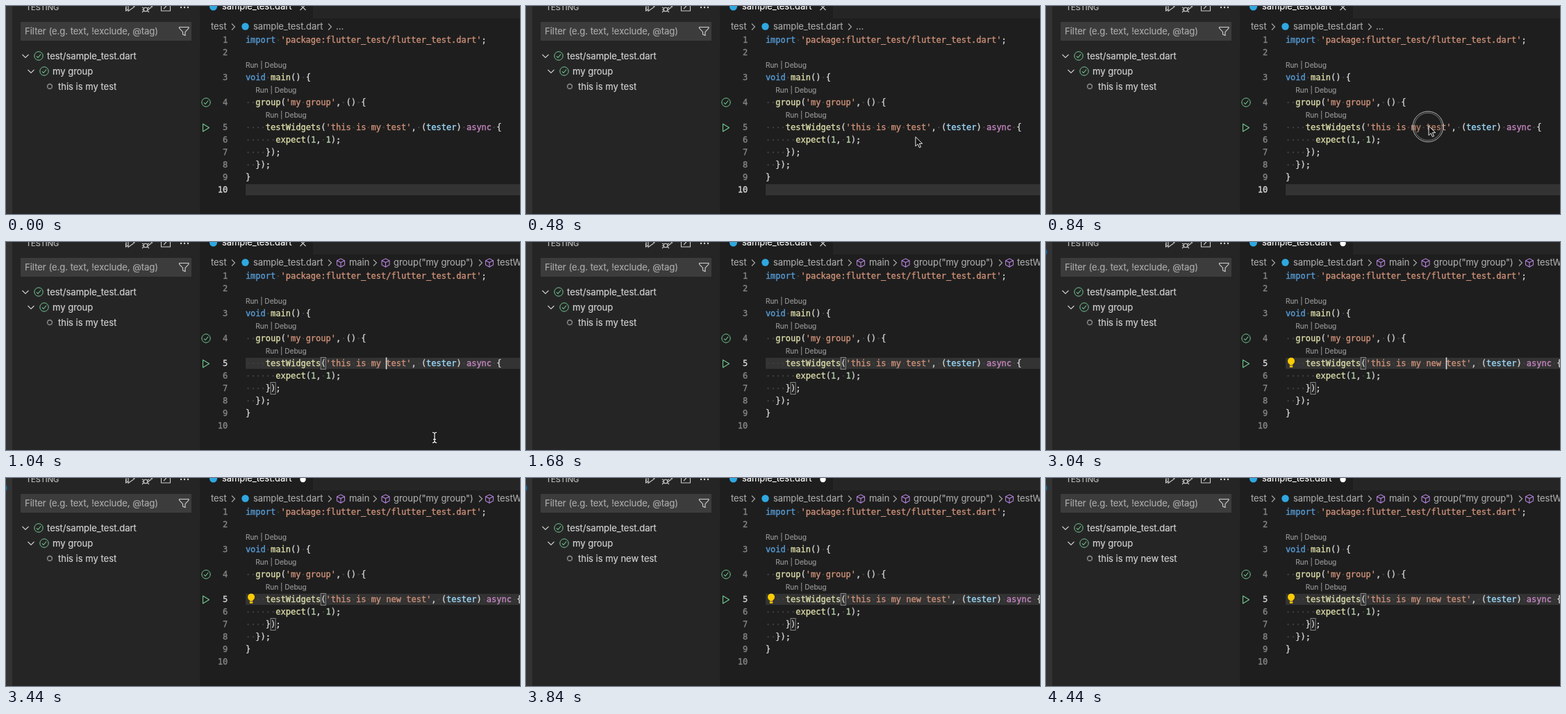
Animation, 740 px wide and 300 px high, one loop 4.68 s. Source, as an HTML page:

```html
<!DOCTYPE html>
<html lang="en">
<head>
<meta charset="utf-8">
<title>Editing a test name</title>
<style>
  html, body { margin: 0; width: 100%; height: 100%; overflow: hidden; background: #1e1e1e; }
  svg { display: block; width: 740px; height: 300px; }
  text { white-space: pre; }
  .ui { font: 13px Inter, "Open Sans", sans-serif; stroke-width: .2; }
  .crumb { font: 12.9px Inter, "Open Sans", sans-serif; stroke-width: .15; }
  .code { font: 12px "DejaVu Sans Mono", monospace; stroke-width: .35; }
  .lens { font: 10.1px Inter, "Open Sans", sans-serif; stroke-width: .15; }
  .line { fill: none; stroke-width: 1.1; }
</style>
</head>
<body>
<svg id="stage" viewBox="0 0 740 300"></svg>
<script>
const LOOP = 4680;
const LEFT = 344.9, CHAR = 7.224;
const KEY_TIMES = [1720, 1800, 1860, 1920];
const CLICKED = 960, BULB = 2000, TREE_UPDATED = 3640;
const C = {
  key: '#569cd6', str: '#ce9178', fn: '#dcdcaa', arg: '#9cdcfe',
  flow: '#c586c0', num: '#b5cea8', plain: '#d4d4d4',
  green: '#73c991', grey: '#a9a9a9', light: '#d0d0d0', dot: '#424242'
};

const stage = document.getElementById('stage');
const $ = id => document.getElementById(id);
const col = n => LEFT + n * CHAR;

// Editor rows share an 18px grid; three of them hold code lenses.
const rowOf = [0, 0, 1, 3, 5, 7, 8, 9, 10, 11, 12];
const rowY = n => 49 + 18 * rowOf[n];

// Text gets a hairline outline in its own colour for a slightly heavier weight.
const ink = color => `fill="${color}" stroke="${color}"`;
const text = (x, y, s, fill = C.light, cls = 'ui', extra = '') =>
  `<text class="${cls}" x="${x}" y="${y}" ${ink(fill)} ${extra}>${s}</text>`;
const crumb = (x, s, extra) => text(x, 34, s, C.grey, 'crumb', extra);
const path = (d, stroke = C.light, extra = '') =>
  `<path class="line" d="${d}" stroke="${stroke}" ${extra}/>`;
const rect = (x, y, w, h, fill, extra = '') =>
  `<rect x="${x}" y="${y}" width="${w}" height="${h}" fill="${fill}" ${extra}/>`;
const disc = (x, y, r, fill, extra = '') =>
  `<circle cx="${x}" cy="${y}" r="${r}" fill="${fill}" ${extra}/>`;
const ring = (x, y, r, stroke, width = 1.1) =>
  `<circle cx="${x}" cy="${y}" r="${r}" fill="none" stroke="${stroke}" stroke-width="${width}"/>`;

const passed = (x, y) =>
  ring(x, y, 6.2, C.green, 1) + path(`M${x - 3} ${y + .3}l2 2.2 4.2-5`, C.green);
const chevronDown = (x, y) => path(`M${x - 4.5} ${y - 2}l4.5 4.5 4.5-4.5`);
const chevronRight = x => path(`M${x - 2} 25.5l4.5 4.5-4.5 4.5`, C.grey);
const cube = x =>
  path(`M${x} 24l5.5 2.8v6.2l-5.5 3-5.5-3v-6.2zM${x - 5.5} 26.8l5.5 2.8 5.5-2.8M${x} 29.6v6.4`, '#b180d7');

const tokens = list => list.map(([kind, s]) =>
  `<tspan ${ink(C[kind])}>${s.replace(/ /g, `<tspan ${ink(C.dot)}>·</tspan>`)}</tspan>`).join('');

const testLine = typed => tokens([
  ['plain', '    '], ['fn', 'testWidgets'], ['plain', '('],
  ['str', `'this is my ${typed}test'`], ['plain', ', ('], ['arg', 'tester'],
  ['plain', ') '], ['flow', 'async'], ['plain', ' {']
]);

const lines = {
  1: [['key', 'import'], ['plain', ' '], ['str', "'package:flutter_test/flutter_test.dart'"], ['plain', ';']],
  3: [['key', 'void'], ['plain', ' '], ['fn', 'main'], ['plain', '() {']],
  4: [['plain', '  '], ['fn', 'group'], ['plain', '('], ['str', "'my group'"], ['plain', ', () {']],
  6: [['plain', '      '], ['fn', 'expect'], ['plain', '('], ['num', '1'], ['plain', ', '], ['num', '1'], ['plain', ');']],
  7: [['plain', '    });']],
  8: [['plain', '  });']],
  9: [['plain', '}']]
};

function sidebar() {
  return rect(0, 0, 9, 300, '#333333') + rect(9, 0, 270, 300, '#252526')
    + disc(-5.5, 14.5, 7.2, '#10699f', 'id="badge"')
    + text(29, 5.5, 'TESTING', '#bbbbbb', 'ui', 'style="font-size:11px"')
    + path('M173-5v10M176-5l9 6-9 6.5zM172.5 2v5l3-2')
    + path('M201-5l9.5 6-5 3.5M201-5v5')
    + ring(201, 5, 2.8, C.light) + path('M196 2l2.5 1.5M196 5.5h2M196 9l2.5-2M206 2l-2.5 1.5M206 5.5h-2M206 9l-2.5-2')
    + path('M223.5-5v12h13v-12M227-3l3.5 3.5-3.5 3.5')
    + [252, 257, 262].map(x => disc(x, 2, 1.2, C.light)).join('')
    + rect(21, 23, 246, 27, '#3c3c3c')
    + text(27, 40.5, 'Filter (e.g. text, !exclude, @tag)', '#a8a8a8')
    + path('M249.5 30.5h13.5v1.5l-5 5.5v5l-3.5-1.5v-3.5l-5-5.5z')
    + chevronDown(28, 72) + passed(47, 72) + text(59, 76.5, 'test/sample_test.dart')
    + chevronDown(36, 94) + passed(55, 94) + text(67, 98.5, 'my group')
    + ring(63, 116, 3.4, '#848484', 1.6) + text(75, 120.5, '', C.light, 'ui', 'id="testName"');
}

function header() {
  return rect(442, 0, 298, 18, '#252526')
    + disc(298.5, 1, 5.5, '#2fa8e0') + text(311, 5, 'sample_test.dart', '#ffffff', 'crumb')
    + `<g id="close">${path('M423.5-2l8 8M431.5-2l-8 8')}</g>`
    + disc(427.5, 2, 4.2, '#ffffff', 'id="dirty"')
    + crumb(295, 'test') + chevronRight(327)
    + disc(344.5, 29.5, 5.2, '#2fa8e0') + crumb(356, 'sample_test.dart') + chevronRight(466)
    + crumb(475, '...', 'id="ellipsis"')
    + `<g id="crumbs">${cube(482)}${crumb(494, 'main')}${chevronRight(531)}`
    + cube(546.5) + crumb(558, 'group("my group")') + chevronRight(683)
    + cube(696) + crumb(707, 'testWidgets') + '</g>';
}

function editor() {
  let out = rect(345, 0, 395, 16, '#333333', 'id="highlight"');
  for (let n = 1; n <= 10; n++) {
    out += text(319.2, rowY(n) + 4, n, '#858585', 'code', `id="num${n}" text-anchor="end"`);
    if (lines[n]) out += text(LEFT, rowY(n) + 4, tokens(lines[n]), C.plain, 'code');
  }
  [85, 121, 157].forEach((y, i) => out += text(col(2 * i), y + 4, 'Run | Debug', '#999999', 'lens'));
  const box = (c, n) => rect(col(c), rowY(n) - 8.5, 7, 17, 'none', 'stroke="#888888"');
  return out + text(LEFT, rowY(5) + 4, '', C.plain, 'code', 'id="testLine"')
    + `<g id="brackets">${box(15, 5)}${box(5, 7)}</g>`
    + passed(288, 139) + path('M283.5 170l9 5.5-9 5.5z', C.green, 'stroke-linejoin="round"')
    + `<g id="bulb">${disc(353, 171.7, 5, '#ffcc00')}${rect(350.8, 175.5, 4.4, 5.3, '#ffcc00')}`
    + path('M350.8 178h4.4', '#333333', 'style="stroke-width:.8"') + '</g>'
    + rect(0, rowY(5) - 8.5, 1.6, 17, '#e0e0e0', 'id="caret"');
}

function pointer() {
  const beam = 'M-3-7.5q3 0 3 2.5v10q0 2.5-3 2.5M3-7.5q-3 0-3 2.5v10q0 2.5 3 2.5M-2 2.5h4';
  return `<g id="pointer"><g id="clickRing">${disc(-1, 1, 22, '#1e1e1e', 'opacity=".15"')}`
    + ring(-1, 1, 22, '#c8c8c8', .9) + ring(-1, 1, 19.8, '#909090', .8) + '</g>'
    + '<path id="arrow" d="M0 0v13.5l3.2-3 2.2 5 2.2-.9-2.2-4.9h4.3z" fill="#111111" stroke="#ffffff" stroke-width=".9"/>'
    + `<g id="beam">${path(beam, '#111111', 'style="stroke-width:3"')}${path(beam, '#ffffff', 'style="stroke-width:1.2"')}</g></g>`;
}

stage.innerHTML = rect(0, 0, 740, 300, '#1e1e1e') + editor() + header() + sidebar() + pointer();

const show = (id, on) => $(id).setAttribute('visibility', on ? 'visible' : 'hidden');

// Time, x, y of the pointer; movement eases between neighbouring stops.
const stops = [[0, 640, 320], [40, 636, 308], [600, 551, 173], [900, 551, 173], [1040, 617, 282], [1100, 636, 320]];
function pointerAt(t) {
  const i = stops.findIndex(s => s[0] > t);
  if (i < 1) return [640, 340];
  const [a, b] = [stops[i - 1], stops[i]];
  const p = (t - a[0]) / (b[0] - a[0]);
  const e = p * p * (3 - 2 * p);
  return [a[1] + (b[1] - a[1]) * e, a[2] + (b[2] - a[2]) * e];
}

// The caret blinks every half second and restarts on a click or on typing.
function caretOn(t) {
  if (t < CLICKED) return false;
  const typing = t >= KEY_TIMES[0];
  const since = typing ? 1900 : CLICKED;
  return (typing && t < since) || Math.floor((t - since) / 500) % 2 === 0;
}

let shownKeys = -1;
function render(t) {
  const clicked = t >= CLICKED;
  const keys = KEY_TIMES.filter(k => t >= k).length;
  const activeLine = clicked ? 5 : 10;

  if (keys !== shownKeys) {
    $('testLine').innerHTML = testLine('new '.slice(0, keys));
    shownKeys = keys;
  }
  $('testName').textContent = t >= TREE_UPDATED ? 'this is my new test' : 'this is my test';
  $('highlight').setAttribute('y', rowY(activeLine) - 8);
  for (const n of [5, 10]) {
    const color = n === activeLine ? '#d6d6d6' : '#858585';
    $('num' + n).setAttribute('fill', color);
    $('num' + n).setAttribute('stroke', color);
  }

  show('ellipsis', !clicked);
  show('crumbs', clicked);
  show('brackets', clicked);
  show('close', keys === 0);
  show('dirty', keys > 0);
  show('badge', t >= BULB);
  show('bulb', t >= BULB);
  show('caret', caretOn(t));
  $('caret').setAttribute('x', col(28 + keys) - .4);

  $('pointer').setAttribute('transform', `translate(${pointerAt(t)})`);
  show('clickRing', t >= 760 && t < 920);
  show('arrow', t < 920);
  show('beam', t >= 920);
}

function tick() {
  render(performance.now() % LOOP);
  requestAnimationFrame(tick);
}
tick();
</script>
</body>
</html>
```
